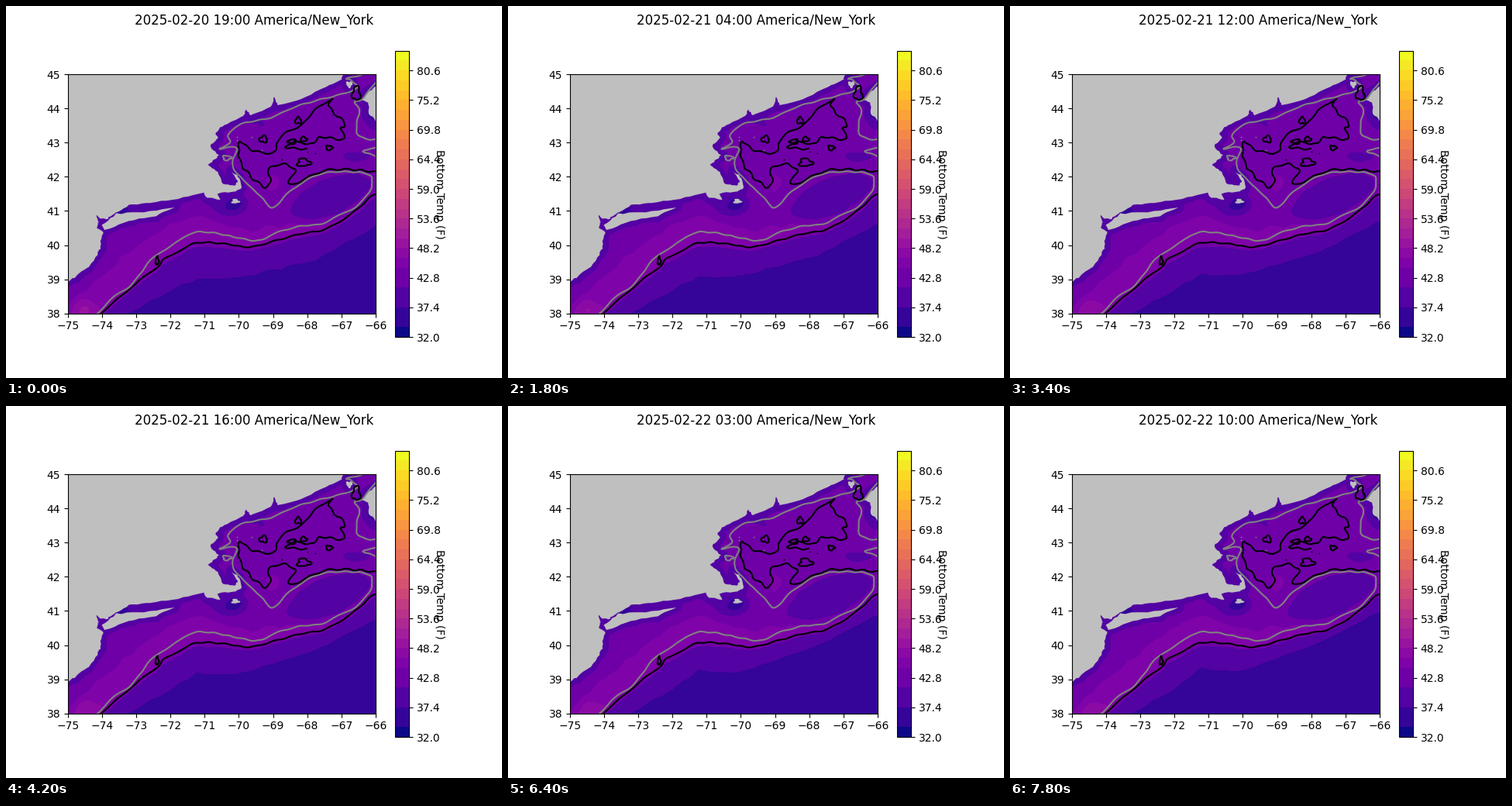
Animation of 640x480 px, one loop 8 s. Source, as a matplotlib script:

```python
import numpy as np
import matplotlib.pyplot as plt
from matplotlib.animation import FuncAnimation
from matplotlib.cm import ScalarMappable
from matplotlib.colors import BoundaryNorm, ListedColormap
from matplotlib.patches import Polygon

FRAMES, INTERVAL = 40, 200
LAYERS = 29
LEVELS = 32 + 1.8 * np.arange(LAYERS + 1)
PX = 396.8 / 9  # stage pixels per degree
LAND = "#bfbfbf"

# The coldest layers share their colour in pairs.
layer = np.arange(LAYERS)
shade = np.where(layer < 7, layer + layer % 2, layer)
COLORS = plt.get_cmap("plasma")(shade / (LAYERS - 1))


def pts(*flat):
    return np.array(flat, float).reshape(-1, 2)


def geo(x, y):
    """Stage pixels to longitude and latitude."""
    return -75 + (x - 80) / PX, 45 - (y - 88.1) / PX


def spline(p, n=8):
    """Catmull-Rom curve through the key points."""
    q = np.vstack([2 * p[0] - p[1], p, 2 * p[-1] - p[-2]])
    a, b, c, d = (q[i:len(q) - 3 + i, None] for i in range(4))
    t = np.linspace(0, 1, n, endpoint=False)[None, :, None]
    curve = b + 0.5 * t * (c - a + t * (2 * a - 5 * b + 4 * c - d + t * (3 * (b - c) + d - a)))
    return np.vstack([curve.reshape(-1, 2), p[-1:]])


def rough(p, amp):
    """Small wobble fixed in space."""
    x, y = p.T
    return p + amp * np.c_[np.sin(y / 2.7 + x / 9), np.sin(x / 3.3 + y / 6)]


def jagged(p, seed, amp=0.5, n=5):
    """Polyline with seeded random notches between its key points."""
    rng = np.random.default_rng(seed)
    t = np.linspace(0, 1, n, endpoint=False)[None, :, None]
    q = (p[:-1, None] + (p[1:] - p[:-1])[:, None] * t).reshape(-1, 2)
    return np.vstack([q + rng.normal(0, amp, q.shape), p[-1:]])


def blob(x, y, rx, ry):
    a = np.linspace(0, 2 * np.pi, 40)
    r = 1 + 0.22 * np.sin(3 * a + x) + 0.12 * np.sin(5 * a + y)
    return np.c_[x + rx * r * np.cos(a), y + ry * r * np.sin(a)]


def sigmoid(z):
    return 1 / (1 + np.exp(-np.clip(z, -50, 50)))


# --- key points in stage pixels -------------------------------------------
MAINLAND = pts(
    78, 358, 92, 347, 107, 336, 116, 324, 122, 313, 122, 303, 126, 291, 117, 286,
    119, 279, 116, 268, 121, 274, 131, 274, 142, 267, 158, 257, 186, 254, 222, 249,
    255, 241, 259, 247, 276, 249, 273, 242, 296, 239, 304, 235, 302, 222, 291, 214,
    299, 226, 295, 232, 280, 230, 273, 214, 261, 205, 268, 199, 275, 193, 263, 181,
    274, 170, 270, 164, 281, 154, 306, 142, 310, 133, 315, 141, 342, 130, 346, 117,
    351, 128, 380, 120, 413, 104, 433, 95, 436, 86)
LONG_ISLE = pts(124, 283, 142, 268, 178, 266, 218, 260, 193, 271, 158, 278, 127, 289)
EAST_CAPE = pts(480, 102, 466, 112, 460, 121, 468, 125, 468, 139, 480, 151)

BREAK = pts(
    78, 440, 123, 397, 152, 371, 183, 346, 197, 335, 203, 327, 214, 322, 238, 308,
    256, 305, 283, 307, 315, 311, 347, 303, 380, 294, 408, 289, 436, 275, 456, 260,
    470, 246, 479, 242)
SHELF = pts(
    105, 409, 117, 397, 140, 375, 163, 358, 190, 325, 222, 304, 240, 293, 262, 292,
    290, 297, 325, 303, 347, 293, 380, 284, 408, 281, 437, 266, 452, 259, 470, 238,
    470, 219, 445, 214, 405, 217, 370, 236, 345, 260, 330, 247, 303, 221, 292, 206,
    296, 190, 296, 182, 276, 184, 289, 177, 287, 166, 304, 152, 342, 144, 370, 131,
    400, 122, 435, 113, 453, 105, 446, 96, 439, 94, 465, 87)
EAST_EDGE = pts(479, 96, 460, 119, 449, 124, 456, 133, 452, 160, 462, 171, 479, 172)
EAST_SPUR = pts(479, 183, 460, 187, 479, 194)
BASIN = pts(
    479, 214, 443, 211, 410, 213, 366, 231, 373, 212, 358, 204, 339, 209, 341, 222,
    336, 234, 318, 222, 302, 200, 302, 174, 315, 185, 345, 189, 355, 168, 384, 152,
    397, 136, 421, 120, 417, 131, 438, 152, 432, 158, 437, 172, 405, 169, 396, 178,
    374, 176, 360, 182, 389, 185)
HOLES = [(332, 172, 5, 4), (377, 148, 4, 4), (384, 202, 8, 5), (417, 183, 4, 3),
         (452, 113, 5, 9), (195, 329, 2, 5), (369, 175, 5, 3), (384, 172, 4, 3)]

coast = jagged(MAINLAND, 3)
lands = [np.vstack([coast, pts(78, 86)]), jagged(LONG_ISLE, 5), jagged(EAST_CAPE, 7),
         blob(296, 252, 5, 3), blob(443, 101, 4, 4)]
slope_edge = spline(BREAK)

# --- temperature field, in colour layers ----------------------------------
X, Y = np.meshgrid(np.arange(78, 482, 3.0), np.arange(86, 402, 3.0))
LON, LAT = geo(X, Y)
shore = np.vstack([coast] + lands[1:])
to_shore = np.sqrt(np.min([(X - x) ** 2 + (Y - y) ** 2 for x, y in shore], axis=0))
below = Y - np.interp(X, *slope_edge.T)  # pixels seaward of the shelf break
noise = np.sin(X / 9 + Y / 14) * np.sin(Y / 8 - X / 21) + 0.6 * np.sin(X / 5) * np.sin(Y / 6 + 1)

FOOT_X = [78, 158, 215, 245, 300, 400, 479]
FOOT_START = np.array([450, 397, 364, 351, 351, 327, 283])
FOOT_END = np.array([450, 397, 361, 339, 341, 304, 264])


def bump(x, y, sx, sy):
    return np.exp(-((X - x) / sx) ** 2 - ((Y - y) / sy) ** 2)


def bank(u):
    """1 on the shallow eastern bank, which spreads westward."""
    dx, dy = X - 420 + 5 * u, Y - 247
    c, s = np.cos(0.36), np.sin(0.36)
    r = np.hypot((c * dx - s * dy) / (56 + 5 * u), (s * dx + c * dy) / (25 + u))
    return sigmoid((1.04 - r) * 14)


def layers(u):
    width = np.interp(X, [80, 190, 250, 320, 430], [50, 46, 36, 22, 10])
    width = width - 6 * u * (X < 220)
    shelf = 6.3 + 1.2 * sigmoid((below + width) / 4) + 0.9 * bump(341, 234, 15, 26)
    shelf -= 2.1 * bank(u)
    shelf = np.minimum(shelf, 3.6 + 0.18 * to_shore)
    shelf += (1.7 - 0.6 * u) * bump(102 + 8 * u, 392, 16, 13)
    for x, y, sx, sy, drop in [(288, 262, 20, 14, 2.6), (452, 194, 30, 12, 1.8),
                               (329, 154, 12, 8, 1.5), (472, 145, 12, 18, 1.2),
                               (150, 264, 14, 7, 2)]:
        shelf -= drop * bump(x, y, sx, sy)
    shelf += 0.2 * noise

    foot = np.interp(X, FOOT_X, FOOT_START + (FOOT_END - FOOT_START) * u)
    s = below / (foot - (Y - below))
    deep = 3 + 1.7 * (1 - s) + 2.5 * np.exp(-14 * np.maximum(s, 0)) + 0.07 * noise
    return np.clip(np.where(below < 0, shelf, deep), 2.1, 10)


# --- figure ---------------------------------------------------------------
fig = plt.figure(figsize=(6.4, 4.8), dpi=100)
ax = fig.add_subplot()
bar = fig.colorbar(ScalarMappable(BoundaryNorm(LEVELS, LAYERS), ListedColormap(COLORS)),
                   ax=ax, ticks=LEVELS[::3], format="%.1f")
bar.minorticks_off()
bar.set_label("Bottom Temp (F)", rotation=270)
title = fig.suptitle("")

for p in lands:
    ax.add_patch(Polygon(np.c_[geo(*p.T)], fc=LAND, ec="none", zorder=2))


def line(color, p):
    ax.plot(*geo(*p.T), color=color, lw=1.5, zorder=2.4)


for p in (SHELF, EAST_EDGE, EAST_SPUR):
    line("gray", rough(spline(p), 0.6))
line("gray", blob(285, 196, 5, 3))
line("black", rough(slope_edge, 0.6))
line("black", rough(spline(BASIN), 1.2))
for hole in HOLES:
    line("black", blob(*hole))
for color, p in [("gray", pts(298, 169, 298, 173, 317, 169, 330, 186)),
                 ("black", pts(399, 190, 389, 188, 356, 198))]:
    ax.plot(*geo(*p.T), ".", ms=2.5, mew=0, color=color, zorder=2.4)

ax.set_aspect("equal")
bands = []


def update(i):
    while bands:
        bands.pop().remove()
    bands.append(ax.contourf(LON, LAT, layers(i / (FRAMES - 1)), zorder=1,
                             levels=np.arange(LAYERS + 1), colors=COLORS))
    ax.set(xlim=(-75, -66), ylim=(38, 45), xticks=range(-75, -65), yticks=range(38, 46))
    hour = 19 + i
    title.set_text(f"2025-02-{20 + hour // 24} {hour % 24:02d}:00 America/New_York")
    return [title]


anim = FuncAnimation(fig, update, frames=FRAMES, interval=INTERVAL, repeat=True,
                     repeat_delay=0, blit=False)
plt.show()
```
